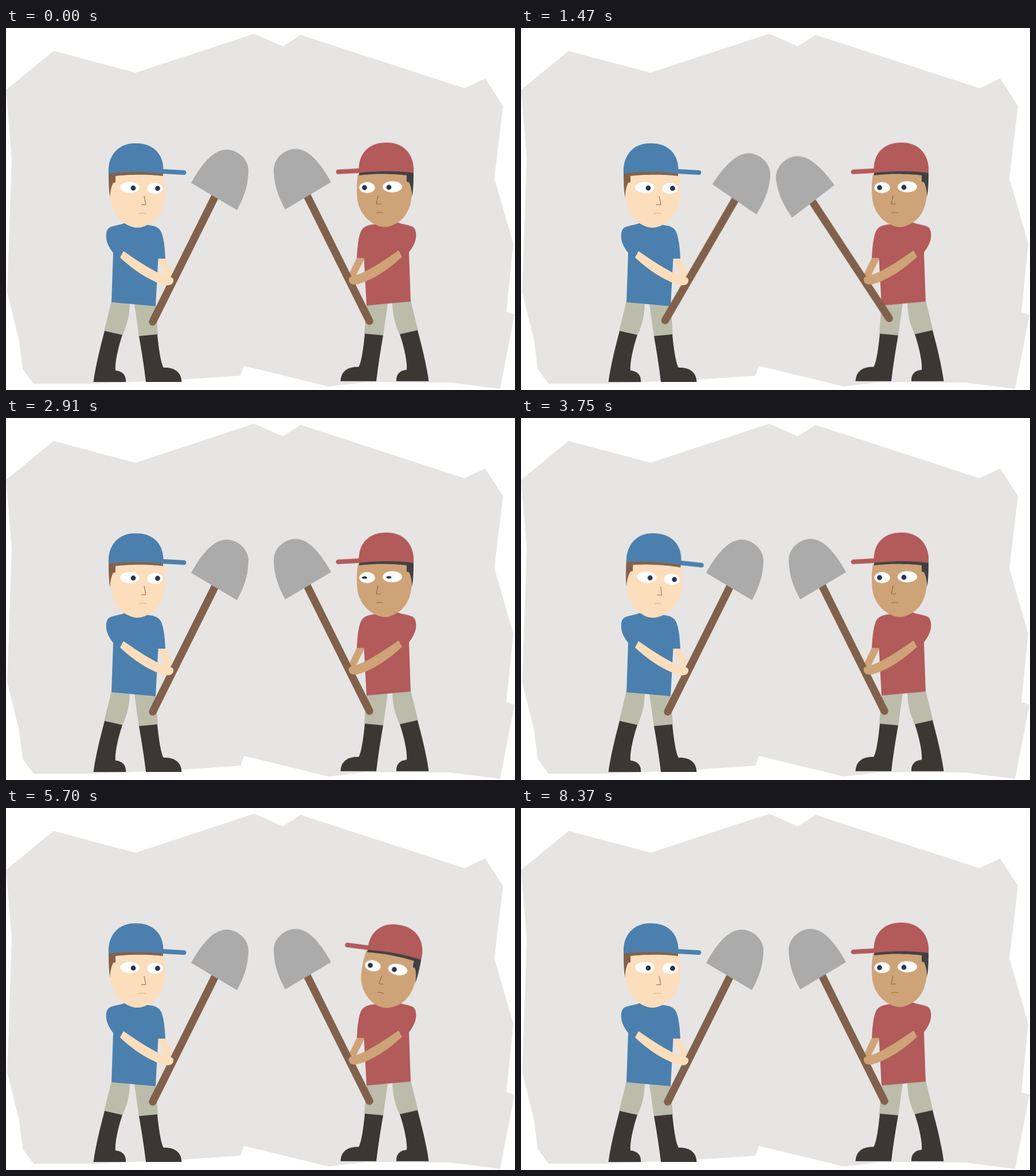
An HTML page without scripts for the animation above (8940 ms loop, 888 by 631 pixels).

```html
<!DOCTYPE html>
<html lang="en">
<head>
<meta charset="utf-8">
<title>Two diggers</title>
<style>
  html, body { margin: 0; width: 100%; height: 100%; overflow: hidden; background: #fff; }
  svg { display: block; width: 100%; height: 100%; }

  .blue { --cloth: #4b80ae; --skin: #fcdebc; --hair: #85614a; --mouth: #dcae84; }
  .red  { --cloth: #b35a5a; --skin: #cea377; --hair: #414042; --mouth: #93683f; }

  .cloth { fill: var(--cloth); }
  .skin { fill: var(--skin); }
  .hair { fill: var(--hair); }
  .trousers { fill: #bcbcab; }
  .boots { fill: #3b3833; }
  .blade { fill: #ababab; }
  .handle { stroke: #81614b; stroke-width: 13.4; stroke-linecap: round; }
  .nose { fill: none; stroke: #83614a; }
  .mouth { fill: none; stroke: var(--mouth); }
  .pupil { fill: #27354d; transform-box: fill-box; transform-origin: center; }

  .shovel, .head, .pupil { animation: 8940ms linear infinite; }
  .shovel { transform-origin: 291px 441px; }
  .blue .shovel { animation-name: swing-blue; }
  .red .shovel { animation-name: swing-red; }
  .blue .head { transform-origin: 229px 339px; animation-name: lean-in; }
  .red .head { transform-origin: 238px 332px; animation-name: lean-back; }
  .blue .pupil { animation-name: blink-blue; }
  .red .pupil { animation-name: blink-red; }

  /* Shovels rise, clash and fall back */
  @keyframes swing-blue {
    0%, 2.685% { transform: rotate(0deg); animation-timing-function: cubic-bezier(.35, .05, .65, .95); }
    11.074% { transform: rotate(5.5deg); }
    27.181%, 100% { transform: rotate(0deg); }
  }
  @keyframes swing-red {
    0%, 2.685% { transform: rotate(0deg); animation-timing-function: cubic-bezier(.35, .05, .65, .95); }
    11.074% { transform: rotate(9.4deg); animation-timing-function: cubic-bezier(.35, .05, .65, .95); }
    27.181%, 100% { transform: rotate(0deg); }
  }

  @keyframes lean-in {
    0%, 40.94% { transform: rotate(0deg); animation-timing-function: steps(13); }
    45.302%, 59.732% { transform: rotate(13.5deg); animation-timing-function: steps(12); }
    63.758%, 100% { transform: rotate(0deg); }
  }
  @keyframes lean-back {
    0%, 59.732% { transform: rotate(0deg); animation-timing-function: steps(12); }
    63.758%, 90.94% { transform: rotate(-10.5deg); animation-timing-function: steps(8); }
    93.624%, 100% { transform: rotate(0deg); }
  }

  @keyframes blink-blue {
    0%, 5.369%, 7.718%, 19.799%, 22.148%, 24.832%, 27.181%, 77.181%, 79.53%, 100% { transform: scaleY(1); }
    6.544%, 20.973%, 26.007%, 78.356% { transform: scaleY(.1); }
  }
  @keyframes blink-red {
    0%, 8.725%, 10.738%, 30.872%, 33.221%, 35.57%, 37.919%, 75.839%, 78.188%, 100% { transform: scaleY(1); }
    9.732%, 32.047%, 36.745%, 77.013% { transform: scaleY(.1); }
  }
</style>
</head>
<body>
<svg viewBox="0 0 888 631">
  <defs>
    <g id="body">
      <path class="trousers" d="M184 476L216 481C215 505 211 518 203 536L171 529ZM224 481L261 484 265 535 232 538Z"/>
      <path class="boots" d="M172 528L203 535C193 565 190 588 191 597C203 598 210 605 209 617H152.500C157 585 165 555 172 528Z
        M232 537L264 534C266 555 270 585 275 592C294 591 306 600 306.500 617H244C241 590 236 560 232 537Z"/>
      <path class="skin" d="M264 402H278L293 433 282 438Z"/>
      <path class="cloth" d="M207 340C200 343 190 344 182 347C174 350 173 364 177 375C180 383 184 388 187 392L184 478 261 485 265.500 402H278C277 380 275 366 271 356C267 347 258 344 244 343Z"/>
    </g>
    <g id="spade">
      <path class="handle" d="M368 287L256 512"/>
      <path class="blade" d="M323 270C338 243 360 211 386 212C406 213 424 230 423 250C422 278 414 297 403 317.500Z"/>
    </g>
    <g id="arm" class="skin">
      <path d="M205 389L199 400C220 420 250 441 277 448C288 450 293 445 292 438C290 433 280 433 271 429C250 420 230 406 205 389Z"/>
      <ellipse cx="229" cy="339" rx="17" ry="9"/>
    </g>
    <g id="face">
      <path class="skin" d="M181 256H276C279 275 278 290 277 300C274 326 252 347 229 348C205 346 187 328 183 300C181 285 181 272 181 256Z"/>
      <path class="hair" d="M179 250H274V258C250 255 215 255 191 258V269L187 270C183 278 182 286 181.500 296C179 280 179 265 179 250Z"/>
      <path class="cloth" d="M179 254C177 222 196 201 225 201C254 200 274 217 274.500 246L311 248C316 249 315 256 311 256L274 254C245 250 205 250 179 254Z"/>
      <g fill="#fff">
        <ellipse cx="216" cy="278" rx="17" ry="9.700"/>
        <ellipse cx="260" cy="279.500" rx="13.700" ry="9.700"/>
      </g>
      <path class="nose" d="M241 293L244 308H236"/>
      <path class="mouth" d="M232 323.500Q238 321.500 244 323.500"/>
    </g>
  </defs>

  <path fill="#e6e5e4" d="M0 108L83 40 226 78 433 10 483 32 514 12 800 105 836 88 867 136 852 262 885 376 873 495 887 500 862 629 775 618 630 617 563 625 415 589 409 606 306 613 155 620H48L29 594 23 545 2 460 10 228Z"/>

  <g class="blue">
    <use href="#body"/>
    <g class="shovel"><use href="#spade"/></g>
    <use href="#arm"/>
    <g class="head">
      <use href="#face"/>
      <circle class="pupil" cx="222" cy="279" r="4.400"/>
      <circle class="pupil" cx="264.500" cy="279.500" r="4.400"/>
    </g>
  </g>

  <g class="red" transform="translate(890 -1.300) scale(-1 1)">
    <use href="#body"/>
    <g class="shovel"><use href="#spade"/></g>
    <use href="#arm"/>
    <g class="head">
      <use href="#face"/>
      <circle class="pupil" cx="222" cy="279" r="4.400"/>
      <circle class="pupil" cx="264.500" cy="279.500" r="4.400"/>
    </g>
  </g>
</svg>
</body>
</html>
```
